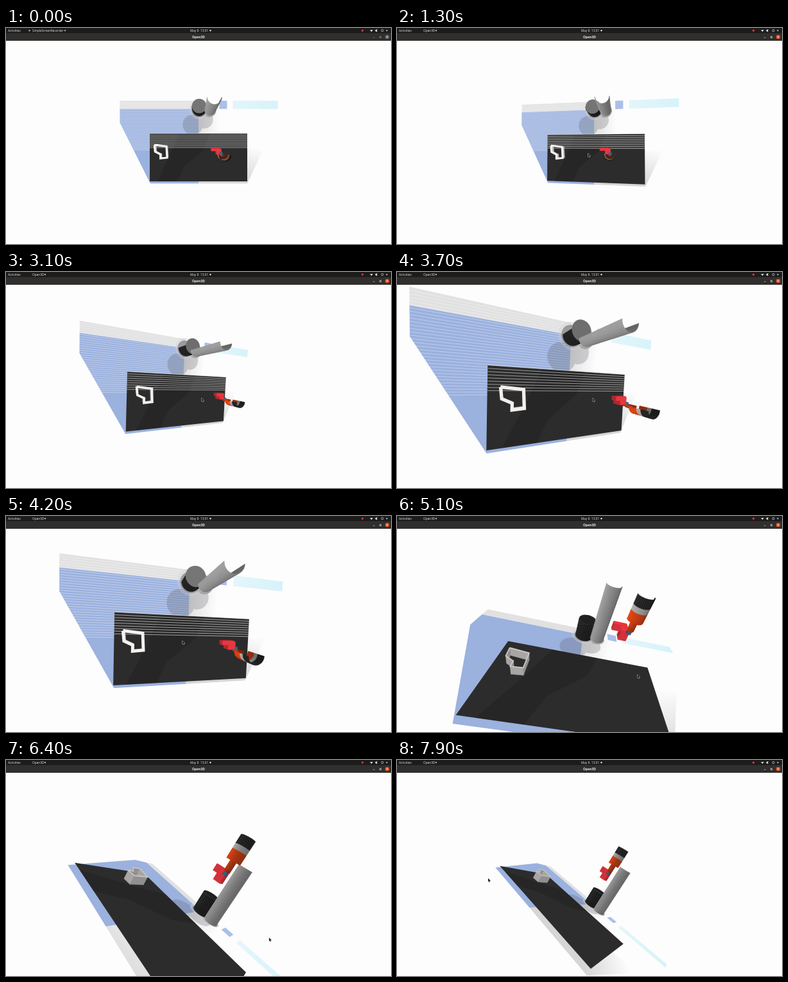
These frames come from a looping animation (600x338 px, 8000 ms). An HTML page with a canvas:

```html
<!DOCTYPE html>
<html lang="en">
<head>
<meta charset="utf-8">
<title>Open3D</title>
<style>
  html, body { margin: 0; width: 100%; height: 100%; overflow: hidden; background: #fdfdfd; }
  canvas { display: block; width: 600px; height: 338px; }
</style>
</head>
<body>
<canvas id="stage" width="600" height="338"></canvas>
<script>
const ctx = document.getElementById('stage').getContext('2d');
const LOOP = 8000, STEP = 100;
const FOCAL = 250, CENTER = [300, 179], PIVOT_HEIGHT = 44, FLOOR = -3;

// Orbit around a fixed pivot: time, yaw, pitch, roll (degrees), distance.
const orbit = [
  [0, -100, 0, 100, 206],
  [800, -100, 0, 100, 206],
  [1300, -100, -9, 100, 206],
  [2000, -100, 9, 100, 206],
  [2300, -96, 28, 98, 195],
  [3100, -96, 29, 98, 195],
  [3500, -96, 29, 98, 136],
  [4000, -96, 29, 98, 136],
  [4200, -100, 15, 102, 138],
  [5100, -7, 54.7, 15.8, 135],
  [5800, 14, 68, 24, 118],
  [6400, 29.5, 79.5, 31, 145],
  [6800, 29.5, 79.5, 31, 110],
  [7300, 29.5, 80.5, 31, 198],
  [LOOP, 29.5, 80.5, 31, 198]
];

const pointer = [
  [0, 329, 180], [100, 329, 180], [300, 537, 192], [500, 537, 192], [900, 310, 196],
  [2000, 276, 196], [2300, 305, 197], [4000, 305, 197], [4200, 275, 195], [5100, 375, 248],
  [6400, 410, 278], [7600, 402, 285], [7900, 142, 185], [LOOP, 142, 185]
];

const mix = (a, b, f) => a.map((v, i) => v + (b[i] - v) * f);
const clamp01 = v => Math.max(0, Math.min(1, v));
const gray = v => `rgb(${v},${v},${v})`;
const tint = (rgb, k) => `rgb(${rgb.map(c => Math.min(255, c * k))})`;

function track(rows, t) {
  const i = Math.max(1, rows.findIndex(r => r[0] >= t));
  const [a, b] = [rows[i - 1], rows[i]];
  return mix(a, b, (t - a[0]) / (b[0] - a[0])).slice(1);
}

// World: x right, y towards the table's front edge, z up from the table top.
let project;

function setCamera([yaw, pitch, roll, distance]) {
  const turn = (a, b, degrees) => {
    const c = Math.cos(degrees * Math.PI / 180), s = Math.sin(degrees * Math.PI / 180);
    return [a * c - b * s, a * s + b * c];
  };
  project = ([x, y, z]) => {
    let across, down, away;
    [across, down] = turn(x, y, yaw);
    [away, down] = turn(PIVOT_HEIGHT - z, down, pitch);
    [across, down] = turn(across, down, roll);
    const depth = Math.max(5, distance + away);
    return [CENTER[0] + across * FOCAL / depth, CENTER[1] + down * FOCAL / depth, depth];
  };
}

const rect = (x0, y0, x1, y1, z) => [[x0, y0, z], [x1, y0, z], [x1, y1, z], [x0, y1, z]];

function ring(x, y, z, r, from = 0, to = Math.PI * 2, count = 28) {
  return Array.from({ length: count + 1 }, (_, i) => {
    const a = from + (to - from) * i / count;
    return [x + r * Math.cos(a), y + r * Math.sin(a), z];
  });
}

function trace(points) {
  points.forEach(([x, y], i) => i ? ctx.lineTo(x, y) : ctx.moveTo(x, y));
  ctx.closePath();
}

function fillFlat(points, color) {
  ctx.beginPath();
  trace(points);
  ctx.fillStyle = color;
  ctx.fill();
}

const fill = (points, color) => fillFlat(points.map(project), color);

function stroke(points, color, width) {
  ctx.beginPath();
  points.forEach(([x, y], i) => i ? ctx.lineTo(x, y) : ctx.moveTo(x, y));
  ctx.strokeStyle = color;
  ctx.lineWidth = width;
  ctx.stroke();
}

function gradient(a, b, from, to) {
  const [p, q] = [project(a), project(b)];
  const g = ctx.createLinearGradient(p[0], p[1], q[0], q[1]);
  g.addColorStop(0, from);
  g.addColorStop(1, to);
  return g;
}

// Far faces first.
function drawFaces(faces) {
  faces.map(({ points, color }) => {
    const flat = points.map(project);
    return { flat, color, depth: flat.reduce((sum, p) => sum + p[2], 0) / flat.length };
  }).sort((a, b) => b.depth - a.depth).forEach(({ flat, color }) => {
    fillFlat(flat, color);
    stroke([...flat, flat[0]], color, .5);
  });
}

function wall(outline, bottom, top, colorAt) {
  return outline.slice(1).map(([x1, y1], i) => {
    const [x0, y0] = outline[i];
    return {
      points: [[x0, y0, bottom], [x1, y1, bottom], [x1, y1, top], [x0, y0, top]],
      color: colorAt(x1 - x0, y1 - y0)
    };
  });
}

// The scanner only saw the front half of each upright cylinder.
function halfShell(x, y, bottom, top, r, rgb) {
  const outline = ring(x, y, 0, r, 0, Math.PI, 14);
  return wall(outline, bottom, top, (dx, dy) => tint(rgb, .92 - .22 * dy / Math.hypot(dx, dy)));
}

function block(x0, y0, z0, x1, y1, z1, rgb) {
  const base = rect(x0, y0, x1, y1, 0);
  const sides = wall([...base, base[0]], z0, z1, (dx, dy) => tint(rgb, dx ? .95 : .78));
  return [...sides, { points: rect(x0, y0, x1, y1, z1), color: tint(rgb, 1.05) }];
}

function scanLines(x0, x1, y0, y1, z, count, color) {
  for (let i = 0; i <= count; i++) {
    const y = y0 + (y1 - y0) * i / count;
    stroke([[x0, y, z], [x1, y, z]].map(project), color, .85);
  }
}

function drawFloor(topDown) {
  const onFloor = points => points.map(([x, y]) => [x, y, FLOOR]);
  const band = rect(-124, -66, 0, -53, FLOOR);
  const blue = onFloor([[-124, -53], [0, -53], [0, 65], [-76, 65], [-124, -31]]);

  fill(onFloor([[0, 0], [0, 65], [77, 65], [103, 9], [77, 12]]),
    gradient([77, 65, FLOOR], [92, 8, FLOOR], '#d6d6d6', '#fdfdfd'));
  fill(rect(0, -53, 34, -10, FLOOR), gradient([0, -30, FLOOR], [34, -30, FLOOR], '#e2e2e2', '#fdfdfd'));
  fill(band, '#e1e1e1');
  fill(blue, '#9bb1de');

  ctx.save();
  ctx.beginPath();
  trace(band.map(project));
  trace(blue.map(project));
  ctx.clip();
  scanLines(-124, 0, -66, 12, FLOOR, 32, `rgba(255,255,255,${.45 * topDown})`);
  ctx.restore();

  ctx.beginPath();
  trace(ring(-9, -28, FLOOR, 16).map(project));
  trace(ring(9, -36, FLOOR, 14).map(project));
  ctx.fillStyle = 'rgba(80,82,90,.24)';
  ctx.fill();

  fill(rect(33, -66, 45, -53, FLOOR), '#a9c0e8');
  fill(rect(54, -66, 125, -53, FLOOR), gradient([54, -60, FLOOR], [125, -60, FLOOR], '#e4f5fb', '#d5f3f9'));
}

function drawTable(topDown) {
  fill(rect(-76, -14, 76, 61, 0), '#2c2c2c');
  const shade = [[-64, 61], [-33, 61], [-23, 38], [8, 12], [18, -14], [-30, -14], [-46, 23]];
  fill(shade.map(([x, y]) => [x, y, 0]), 'rgba(0,0,0,.14)');
  scanLines(-76, 76, -14, 8, 0, 8, `rgba(235,235,235,${.75 * topDown})`);
}

function drawOpenBox(topDown) {
  const plan = [[-66, 4], [-48, 6], [-47, 23], [-57, 24], [-57, 18], [-65, 14], [-66, 4]];
  const height = 10;
  const shadeSide = dx => tint([215, 212, 210], (Math.abs(dx) > 5 ? .78 : .68) + .22 * topDown);
  drawFaces(wall(plan, 0, height, shadeSide));
  const rim = plan.map(([x, y]) => project([x, y, height]));
  stroke(rim, tint([205, 202, 200], 1 + .2 * topDown), (1 + 2 * topDown) * FOCAL / rim[0][2]);
}

function drawRobot(topDown) {
  const [stumpX, stumpY, stumpTop] = [1, -52, 22];
  const [tubeX, tubeY] = [18, -51];
  fill(ring(tubeX - 1, tubeY, FLOOR, 11), '#a6a6a6');
  fill(ring(stumpX, stumpY, FLOOR, 12), '#9a9a9a');
  [13, 14.6].forEach(r => stroke(ring(stumpX, stumpY, FLOOR, r).map(project), '#cfcfcf', .8));

  drawFaces(halfShell(stumpX, stumpY, FLOOR, stumpTop, 10.3, [30, 30, 30]));
  fill(ring(stumpX, stumpY, stumpTop, 10.3), gray(32 + 85 * topDown));
  drawFaces(halfShell(tubeX, tubeY, FLOOR, 70, 8.2, [138, 138, 138]));

  const [armX, armY] = [27, 13.5];
  const red = [222, 52, 60];
  drawFaces([
    ...block(15, 7, 56, 25, 10, 62, red),
    ...block(21, 8, 51, 27, 14, 60, red),
    ...block(25.5, 12, 58, 28, 15, 62, [58, 98, 140]),
    ...halfShell(armX, armY, 61, 70, 2.4, [176, 50, 10]),
    ...halfShell(armX, armY, 70, 78, 5.7, [196, 58, 14]),
    ...halfShell(armX, armY, 78, 82, 5.7, [150, 150, 150]),
    ...halfShell(armX, armY, 82, 89, 5.7, [32, 32, 32])
  ]);
}

function drawScene(t) {
  const pose = track(orbit, t);
  setCamera(pose);
  const topDown = clamp01((52 - pose[1]) / 25);
  drawFloor(topDown);
  drawTable(topDown);
  drawOpenBox(topDown);
  drawRobot(topDown);
}

function drawPointer(t) {
  const [x, y] = track(pointer, t);
  const arrow = [[0, 0], [0, 5.6], [1.3, 4.5], [2.2, 6.4], [3, 6], [2.2, 4.2], [3.9, 4], [0, 0]]
    .map(([dx, dy]) => [x + dx, y + dy]);
  stroke(arrow, '#ddd', .8);
  fillFlat(arrow, '#222');
}

function text(label, x, y, size = 4.8, weight = 400, color = '#e6e6e6') {
  ctx.font = `${weight} ${size}px "Open Sans", sans-serif`;
  ctx.fillStyle = color;
  ctx.fillText(label, x, y);
}

function dot(x, y, r, color) {
  ctx.beginPath();
  ctx.arc(x, y, r, 0, 7);
  ctx.fillStyle = color;
  ctx.fill();
}

const triangle = (x, y, w = 1.5) => fillFlat([[x - w, y - 1], [x + w, y - 1], [x, y + w * .8]], '#ddd');

function drawBars(focused) {
  ctx.fillStyle = '#1c1c1c';
  ctx.fillRect(0, 0, 600, 8);
  ctx.fillStyle = '#302f2d';
  ctx.fillRect(0, 8, 600, 12);

  text('Activities', 3, 6);
  if (focused) {
    text('Open3D', 41, 6);
    triangle(61, 4.2);
  } else {
    dot(36.5, 4, 1.3, '#aaa');
    text('SimpleScreenRecorder', 41, 6, 4.6);
    triangle(92, 4.2);
  }
  text('May 8  13:01', 287, 6);
  dot(318.5, 4, 1.2, '#eee');

  dot(555.5, 4, 1.8, '#c93a3a');
  triangle(569.5, 4, 2.4);
  fillFlat([[575.5, 3.2], [578.3, 1.8], [578.3, 6.2], [575.5, 4.9]], '#ddd');
  dot(586.5, 4, 2, '#ccc');
  dot(586.5, 4, 1.3, '#1c1c1c');
  triangle(593.5, 4.2);

  ctx.textAlign = 'center';
  text('Open3D', 300, 16, 5, 700, '#f0f0f0');
  ctx.textAlign = 'left';
  const ink = focused ? '#d8d8d8' : '#8c8c8c';
  stroke([[572, 15], [574.5, 15]], ink, .7);
  ctx.strokeRect(582.5, 13.2, 2.2, 2.2);
  dot(594, 14, 3.2, focused ? '#e95420' : '#686663');
  stroke([[592.9, 12.9], [595.1, 15.1]], '#eee', .7);
  stroke([[595.1, 12.9], [592.9, 15.1]], '#eee', .7);
}

function frame(now) {
  const t = Math.floor(now % LOOP / STEP) * STEP;
  ctx.fillStyle = '#fdfdfd';
  ctx.fillRect(0, 0, 600, 338);
  drawScene(t);
  if (t >= STEP) drawPointer(t);
  drawBars(t >= 700);
  requestAnimationFrame(frame);
}
requestAnimationFrame(frame);
</script>
</body>
</html>
```
